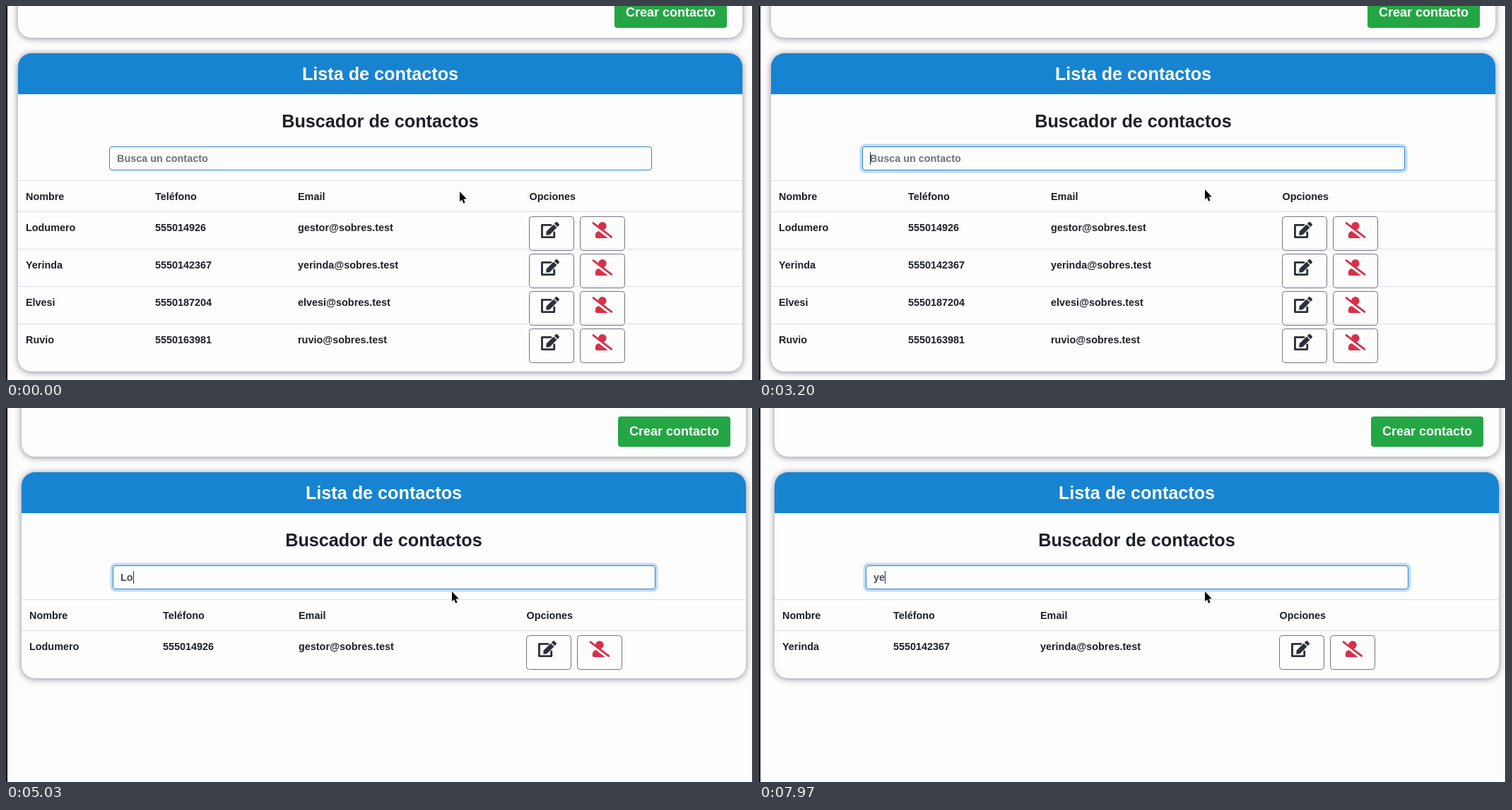
Recreate the animation shown at these times as an HTML page with a canvas. Size 1057 px wide and 530 px high, loop 8 s.

```html
<!DOCTYPE html>
<html lang="es">
<head>
<meta charset="utf-8">
<title>Lista de contactos</title>
<style>
  html, body { margin: 0; width: 100%; height: 100%; overflow: hidden; background: #fdfdfd; }
  canvas { display: block; width: 1057px; height: 530px; }
</style>
</head>
<body>
<canvas id="stage" width="1057" height="530"></canvas>
<script>
const ctx = document.getElementById('stage').getContext('2d');
const LOOP = 8000;
const FONT = '"Liberation Sans", Arial, sans-serif';
const INK = '#1d2027', BLUE = '#1784d2', PAGE = '#fdfdfd', RED = '#d9304a';

const contacts = [
  ['Lodumero', '555014926', 'gestor@sobres.test'],
  ['Yerinda', '5550142367', 'yerinda@sobres.test'],
  ['Elvesi', '5550187204', 'elvesi@sobres.test'],
  ['Ruvio', '5550163981', 'ruvio@sobres.test']
];

// Column offsets inside the card for each number of matches or query
const columns = {
  '': [11, 194, 396, 723.5],
  l: [11, 197, 402, 719.5],
  lo: [11, 200, 392, 714.5],
  y: [11, 168, 376, 714.5]
};
columns.ye = columns.y;

const FOCUS = 2150;
const typing = [[0, ''], [FOCUS, ''], [3600, 'L'], [4000, 'Lo'], [5200, 'L'], [5350, ''], [6450, 'y'], [6900, 'ye']];
const pointer = [[0, 642, 264], [1750, 642, 264], [2100, 632, 224], [2300, 632, 224], [2700, 631, 261], [LOOP, 631, 261]];

function text(str, x, y, size = 14.4, color = INK, align = 'left') {
  ctx.font = `bold ${size}px ${FONT}`;
  ctx.fillStyle = color;
  ctx.textAlign = align;
  ctx.fillText(str, x, y);
}

function box(x, y, w, h, r, fill, stroke, line = 1) {
  ctx.beginPath();
  ctx.roundRect(x, y, w, h, r);
  if (fill) { ctx.fillStyle = fill; ctx.fill(); }
  if (stroke) { ctx.strokeStyle = stroke; ctx.lineWidth = line; ctx.stroke(); }
}

function poly(points, fill) {
  ctx.beginPath();
  points.forEach(([x, y]) => ctx.lineTo(x, y));
  ctx.closePath();
  ctx.fillStyle = fill;
  ctx.fill();
}

function card(x, y, h) {
  ctx.save();
  ctx.shadowColor = 'rgba(20,20,40,.5)';
  ctx.shadowBlur = 10;
  ctx.shadowOffsetY = 1;
  box(x, y, 1025, h, 19, PAGE);
  ctx.restore();
}

function rule(x, y) {
  ctx.fillStyle = '#dcdfe4';
  ctx.fillRect(x, y, 1025, 1);
}

function icon(x, y, draw) {
  ctx.save();
  ctx.translate(x, y);
  ctx.scale(0.045, 0.045);
  ctx.lineWidth = 64;
  ctx.lineJoin = 'round';
  ctx.lineCap = 'round';
  draw();
  ctx.restore();
}

function editIcon() {
  const color = '#2b303b';
  ctx.strokeStyle = color;
  ctx.beginPath();
  ctx.moveTo(310, 96);
  ctx.lineTo(32, 96);
  ctx.lineTo(32, 480);
  ctx.lineTo(416, 480);
  ctx.lineTo(416, 332);
  ctx.stroke();
  poly([[396, 76], [500, 180], [274, 406], [160, 416], [170, 302]], color);
  poly([[418, 54], [472, 2], [506, 2], [574, 70], [574, 104], [522, 158]], color);
}

function removeIcon() {
  ctx.strokeStyle = RED;
  ctx.fillStyle = RED;
  ctx.beginPath();
  ctx.arc(320, 128, 128, 0, 7);
  ctx.fill();
  ctx.beginPath();
  ctx.moveTo(207, 290);
  ctx.quadraticCurveTo(96, 315, 96, 422);
  ctx.lineTo(96, 464);
  ctx.quadraticCurveTo(96, 512, 144, 512);
  ctx.lineTo(494, 512);
  ctx.fill();
  ctx.beginPath();
  ctx.moveTo(34, 36);
  ctx.lineTo(606, 477);
  ctx.stroke();
}

function searchBox(x, y, t, query, since) {
  const focused = t >= FOCUS;
  if (focused) box(x + 127.5, y + 130.5, 771, 37, 6, null, '#bfdcf7', 4);
  box(x + 129.5, y + 132.5, 767, 33, 3.5, PAGE, focused ? '#2f83cf' : '#3588c6');
  text(query || 'Busca un contacto', x + 140, y + 154, 14.4, query ? '#495057' : '#6c737a');
  if (focused && (t - since) % 1000 < 500) {
    const w = query ? ctx.measureText(query).width : 0;
    ctx.fillStyle = '#30343a';
    ctx.fillRect(Math.round(x + 140 + w), y + 140, 1, 18);
  }
}

function table(x, y, rows, cols) {
  rule(x, y + 180);
  ['Nombre', 'Teléfono', 'Email', 'Opciones'].forEach((s, i) => text(s, x + cols[i], y + 208));
  rows.forEach((row, i) => {
    const top = y + 224 + 53 * i;
    rule(x, top);
    row.forEach((s, c) => text(s, x + cols[c], top + 28));
    const bx = x + cols[3];
    box(bx, top + 7.5, 63, 48, 4, PAGE, '#70757c');
    box(bx + 72, top + 7.5, 63, 48, 4, PAGE, '#70757c');
    icon(bx + 16.5, top + 15, editIcon);
    icon(bx + 89, top + 15, removeIcon);
  });
}

function arrow(t) {
  const i = pointer.findIndex(p => p[0] > t);
  const [t0, x0, y0] = pointer[i - 1], [t1, x1, y1] = pointer[i];
  const k = (t - t0) / (t1 - t0), e = k * k * (3 - 2 * k);
  ctx.save();
  ctx.translate(x0 + (x1 - x0) * e, y0 + (y1 - y0) * e);
  ctx.shadowColor = 'rgba(0,0,0,.35)';
  ctx.shadowBlur = 2;
  ctx.shadowOffsetY = 1;
  ctx.lineJoin = 'round';
  poly([[0, -1], [0, 13], [3, 10.2], [5.2, 15.4], [7.6, 14.4], [5.4, 9.4], [9.6, 9.2]], '#050505');
  ctx.shadowColor = 'transparent';
  ctx.globalCompositeOperation = 'source-over';
  ctx.strokeStyle = 'rgba(255,255,255,.9)';
  ctx.lineWidth = 1.6;
  ctx.stroke();
  ctx.fill();
  ctx.restore();
}

function draw(t) {
  const [since, query] = typing.filter(s => s[0] <= t).pop();
  const key = query.toLowerCase();
  const rows = contacts.filter(c => c[0].toLowerCase().includes(key));
  // A shorter list removes the scrollbar and clamps the page scroll
  const x = query ? 22 : 17;
  const y = t < typing[2][0] ? 67 : 91;

  ctx.fillStyle = PAGE;
  ctx.fillRect(0, 0, 1057, 530);

  card(x, y - 400, 378);
  box(x + 844, y - 79, 159, 43, 4, '#24a645');
  text('Crear contacto', x + 923.5, y - 52, 18, '#fff', 'center');

  card(x, y, 239 + 53 * rows.length);
  box(x, y, 1025, 58, [19, 19, 0, 0], BLUE);
  text('Lista de contactos', x + 512.5, y + 38, 25.2, '#fff', 'center');
  text('Buscador de contactos', x + 512.5, y + 105, 25.2, INK, 'center');
  searchBox(x, y, t, query, since);
  table(x, y, rows, columns[key]);

  ctx.fillStyle = '#000';
  ctx.fillRect(0, 0, 2, 530);
  ctx.fillRect(1056, 0, 1, 530);
  arrow(t);
}

function tick() {
  draw(performance.now() % LOOP);
  requestAnimationFrame(tick);
}
tick();
</script>
</body>
</html>
```
